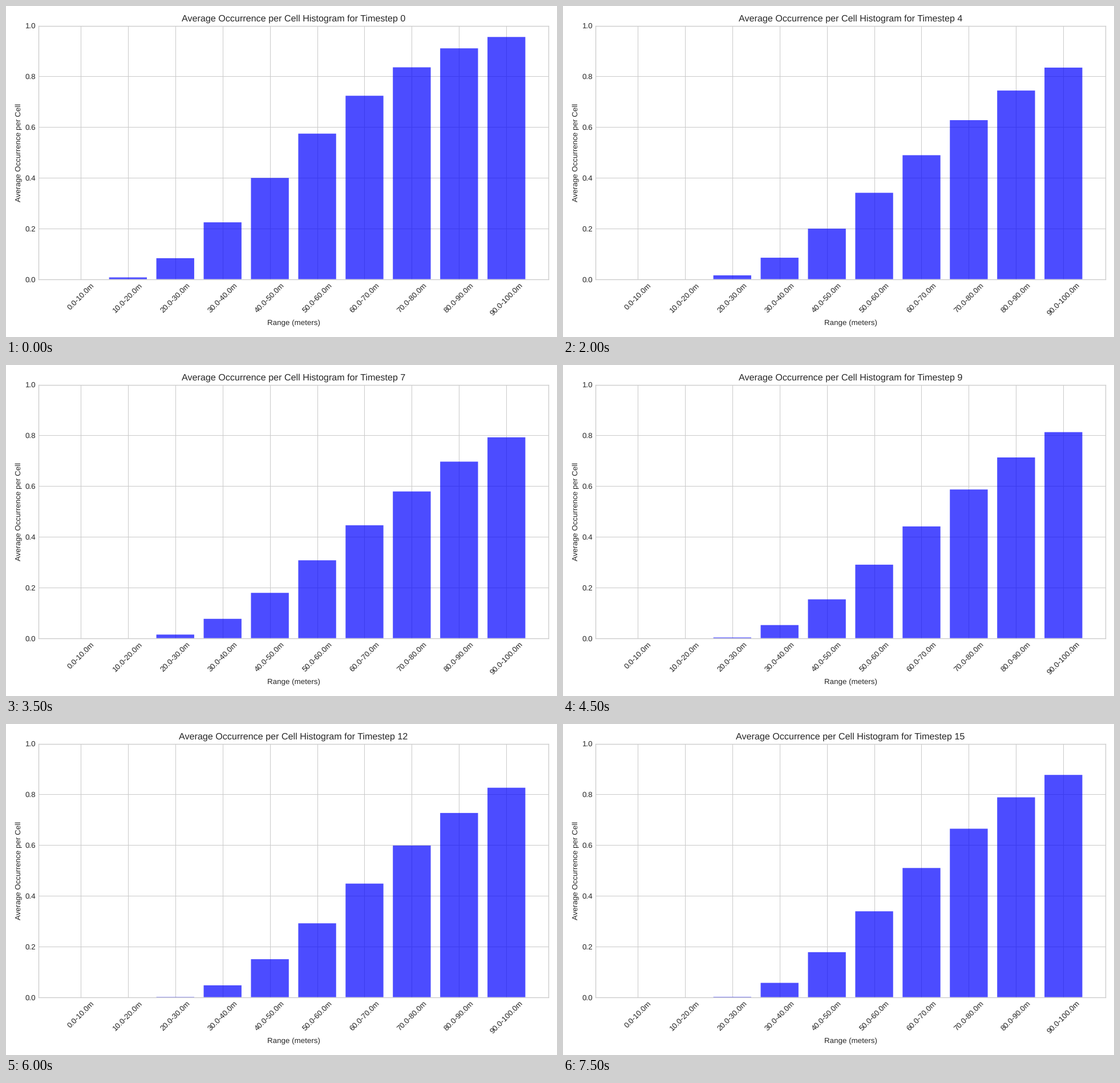
A matplotlib script that plays this animation: 966 by 580 pixels, repeating every 8 s.

```python
import matplotlib.pyplot as plt
import numpy as np
from matplotlib.animation import FuncAnimation

W, H, DPI = 966, 580, 96
STEPS, STEP_MS = 16, 500
LEFT, RIGHT, TOP, BOTTOM = 57.1, 951.1, 34.5, 478.7

# The profile over range drifts through a few key shapes:
# how fast it rises, and the bin at which it leaves zero
KEYS = [0, 2, 4, 7, 10, 12, 15]
RATE = [.210, .190, .174, .162, .185, .184, .201]
START = [.60, 1.23, 1.29, 1.26, 1.92, 1.81, 1.80]
BINS = np.arange(10)


def heights(step):
    rate = np.interp(step, KEYS, RATE)
    start = np.interp(step, KEYS, START)
    reach = rate * np.maximum(BINS - start, 0)
    return 1 - np.exp(-reach ** 2)


plt.style.use("seaborn-v0_8-whitegrid")
plt.rcParams.update({
    "font.family": "Liberation Sans",
    "font.size": 10.06,
    "text.hinting": "none",
})

fig = plt.figure(figsize=(W / DPI, H / DPI), dpi=DPI)
ax = fig.add_axes([LEFT / W, 1 - BOTTOM / H,
                   (RIGHT - LEFT) / W, (BOTTOM - TOP) / H])

labels = [f"{10 * b:.1f}-{10 * b + 10:.1f}m" for b in BINS]
bars = ax.bar(labels, heights(0), color="blue", alpha=0.7, snap=False)
ax.set_xlim(-0.89, 9.89)
ax.set_ylim(0, 1)
ax.set_xlabel("Range (meters)")
ax.set_ylabel("Average Occurrence per Cell")
ax.tick_params(axis="x", rotation=45)
title = ax.set_title("")


def update(step):
    for bar, height in zip(bars, heights(step)):
        bar.set_height(height)
    title.set_text(
        f"Average Occurrence per Cell Histogram for Timestep {step}")
    return [*bars, title]


anim = FuncAnimation(fig, update, frames=STEPS, interval=STEP_MS,
                     repeat=True, repeat_delay=0, blit=False)
plt.show()
```
